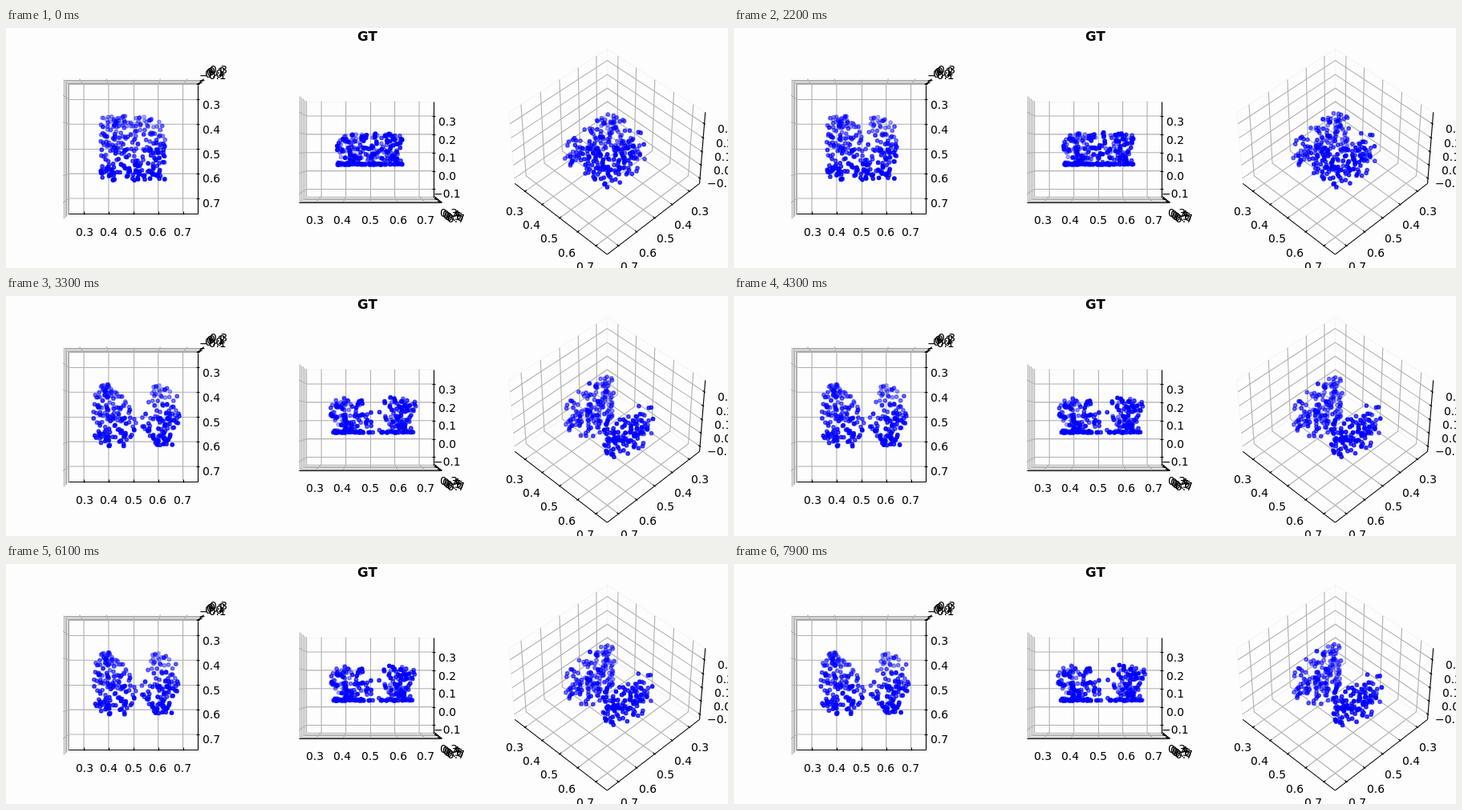
Animation of 900x300 px, one loop 8000 ms. Source, as an HTML page with a canvas:

```html
<!DOCTYPE html>
<html>
<head>
<meta charset="utf-8">
<style>
html, body { margin: 0; width: 900px; height: 300px; overflow: hidden; background: #fdfdfd; }
canvas { display: block; }
</style>
</head>
<body>
<canvas id="stage" width="900" height="300"></canvas>
<script>
const ctx = document.getElementById('stage').getContext('2d');
const SCALE = 1468, DIST = 10, CY = 151.2;
const HALF = [0.5714, 0.5714, 0.4286];      // half sizes of the axes box
const MID = [0.5, 0.5, 0.12];               // data value at the box centre
const UNIT = [2.194, 2.194, 1.6457];        // box length per data unit
const TICKS = [[.3, .4, .5, .6, .7], [.3, .4, .5, .6, .7], [-.1, 0, .1, .2, .3]];
const EDGE = [[0, 1, -1], [1, 0, -1], [-1, 1, 0]];  // box edge carrying each axis
const TICK_DIR = [1, 0, 1];
const VIEWS = [
  { cx: 158.8, elev: 90, azim: 0 },
  { cx: 454.1, elev: 0, azim: 0 },
  { cx: 749.4, elev: 45, azim: 45 }
];
const rad = d => d * Math.PI / 180;
const mix = (a, b, k) => a + (b - a) * k;
const toBox = (value, a) => (value - MID[a]) * UNIT[a];

function depthOf([x, y, z], elev, azim) {
  const e = rad(elev), a = rad(azim);
  return DIST - (x * Math.cos(a) + y * Math.sin(a)) * Math.cos(e) - z * Math.sin(e);
}

function project(p, { cx, elev, azim }) {
  const e = rad(elev), a = rad(azim);
  const side = p[1] * Math.cos(a) - p[0] * Math.sin(a);
  const ahead = p[0] * Math.cos(a) + p[1] * Math.sin(a);
  const up = p[2] * Math.cos(e) - ahead * Math.sin(e);
  const k = SCALE / depthOf(p, elev, azim);
  return [cx + side * k, CY - up * k];
}

// Lines made only of level and upright parts are snapped to whole pixels
function polyline(view, points, color) {
  let path = points.map(p => project(p, view));
  const straight = path.every((p, i) => !i || p.some((c, j) => Math.abs(c - path[i - 1][j]) < 1e-4));
  if (straight) path = path.map(p => p.map(c => Math.floor(c + 0.5) + 0.5));
  ctx.beginPath();
  for (const p of path) ctx.lineTo(...p);
  ctx.strokeStyle = color;
  ctx.lineWidth = 1.11;
  ctx.stroke();
}

function label(text, x, baseline) {
  const left = x - ctx.measureText(text).width / 2;
  ctx.fillText(text, Math.round(left), Math.round(baseline));
}

// A box point given by signs, with some coordinates replaced
const corner = (signs, set = {}) => signs.map((s, i) => i in set ? set[i] : s * HALF[i]);

function drawAxes(view) {
  const low = [-1, -1, -1];
  const rim = [[-1, -1], [1, -1], [1, 1], [-1, 1], [-1, -1]];
  for (let a = 0; a < 3; a++) {
    const b = (a + 1) % 3, c = (a + 2) % 3;
    polyline(view, rim.map(([m, n]) => corner(low, { [b]: m * HALF[b], [c]: n * HALF[c] })), '#f5f5f5');
  }
  for (let a = 0; a < 3; a++) {
    const b = (a + 1) % 3, c = (a + 2) % 3;
    for (const t of TICKS[a]) {
      const at = toBox(t, a);
      polyline(view, [
        corner(low, { [a]: at, [b]: HALF[b] }),
        corner(low, { [a]: at }),
        corner(low, { [a]: at, [c]: HALF[c] })
      ], '#b0b0b0');
    }
  }
  ctx.font = '13.89px "DejaVu Sans", sans-serif';
  ctx.fillStyle = '#000';
  for (let a = 0; a < 3; a++) {
    const edge = EDGE[a], d = TICK_DIR[a];
    polyline(view, [corner(edge, { [a]: -HALF[a] }), corner(edge, { [a]: HALF[a] })], '#000');
    for (const t of TICKS[a]) {
      const at = toBox(t, a);
      polyline(view, [
        corner(edge, { [a]: at, [d]: HALF[d] + 0.0095 }),
        corner(edge, { [a]: at, [d]: HALF[d] - 0.019 })
      ], '#000');
      const spot = edge.map((s, i) => i === a ? at : s * HALF[i] * 1.224);
      const [x, y] = project(spot, view);
      label(t.toFixed(1).replace('-', '\u2212'), x, y + 11.4);
    }
  }
}

// Seeded block of particles: across u, along v (-1..1), height h (0..1)
let seed = 20;
function random() {
  seed = seed + 0x6D2B79F5 | 0;
  let t = Math.imul(seed ^ seed >>> 15, 1 | seed);
  t = t + Math.imul(t ^ t >>> 7, 61 | t) ^ t;
  return ((t ^ t >>> 14) >>> 0) / 4294967296;
}
const WIDE = 0.127, CUT = 0.01;
const particles = Array.from({ length: 285 }, () => ({
  u: (random() * 2 - 1) * WIDE,
  v: random() * 2 - 1,
  h: random() < 0.27 ? 0 : random(),
  lift: random()
}));

// How far the block has been parted, by time in ms
const KEYS = [[0, 0], [1000, .02], [1800, .08], [2200, .28], [2700, .55], [3300, 1],
  [3700, .96], [4300, .93], [6300, .92], [7000, 1.07], [8000, 1.08]];
function progress(ms) {
  const i = KEYS.findIndex(k => k[0] > ms);
  const [t0, p0] = KEYS[i - 1], [t1, p1] = KEYS[i];
  return mix(p0, p1, (ms - t0) / (t1 - t0));
}

// The notch opens from the low-x side first; each half is stretched between its edges
function place({ u, v, h, lift }, p) {
  const start = 0.175 * (v + 1);
  const open = Math.max(0, (p - start) / (1 - start)) ** 0.7;
  const side = u < CUT ? -1 : 1;
  const along = v - 0.08 * p * Math.sin(Math.PI * (v - 0.1));
  const off = along - 0.2;
  let inner, outer;
  if (side < 0) {
    inner = 0.018 - 0.075 * Math.abs(off) ** 1.2;
    outer = -0.155 + 0.02 * along * along;
  } else {
    inner = 0.026 + (off < 0 ? -0.045 : 0.09) * off;
    outer = 0.18 - 0.024 * (along + 0.3) ** 2;
  }
  const w = (u - CUT) / (side * WIDE - CUT);
  const across = mix(mix(CUT, inner, open), mix(side * WIDE, outer, p), w);
  const lean = side * p * 0.02 * (h - 0.5) * w;
  const x = 0.5 + along * mix(WIDE, 0.122, p);
  const z = 0.041 + h * (0.157 + 0.025 * p * lift);
  return [x, 0.5 + across + lean, z].map(toBox);
}

function drawCloud(view, cloud) {
  const shaded = cloud.map(p => [depthOf(p, Math.min(view.elev, 45), view.azim), p]);
  shaded.sort((a, b) => b[0] - a[0]);
  const far = shaded[0][0], near = shaded[shaded.length - 1][0];
  ctx.fillStyle = ctx.strokeStyle = '#00f';
  ctx.lineWidth = 1.39;
  for (const [depth, p] of shaded) {
    ctx.globalAlpha = 1 - 0.7 * (depth - near) / (far - near);
    ctx.beginPath();
    ctx.arc(...project(p, view), 2.2, 0, Math.PI * 2);
    ctx.fill();
    ctx.stroke();
  }
  ctx.globalAlpha = 1;
}

function frame() {
  const ms = Math.floor(performance.now() % 8000 / 100) * 100;
  const p = progress(ms);
  const cloud = particles.map(q => place(q, p));
  ctx.fillStyle = '#fdfdfd';
  ctx.fillRect(0, 0, 900, 300);
  for (const view of VIEWS) {
    drawAxes(view);
    drawCloud(view, cloud);
  }
  ctx.font = 'bold 16.67px "DejaVu Sans", sans-serif';
  ctx.fillStyle = '#000';
  label('GT', 450, 16);
  requestAnimationFrame(frame);
}
frame();
</script>
</body>
</html>
```
